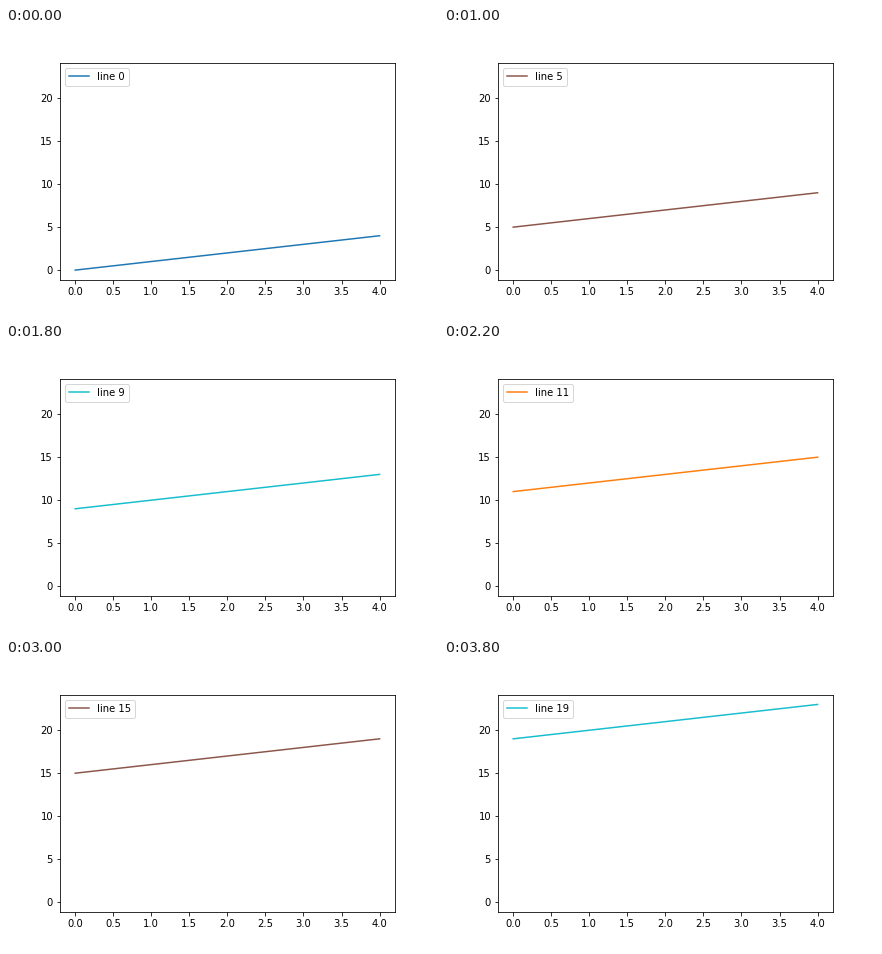
Write a matplotlib script that moves like this. It is 432 by 288 pixels and loops after 4 s.

```python
import numpy as np
import matplotlib.pyplot as plt
from matplotlib.animation import FuncAnimation

COUNT = 20
INTERVAL = 200

x = np.arange(5)

fig, ax = plt.subplots(figsize=(6, 4), dpi=72)
fig.subplots_adjust(bottom=0.125)
ax.set_xlim(-0.2, 4.2)
ax.set_ylim(-1.15, 24.15)
line, = ax.plot(x, x)


def update(i):
    line.set_ydata(x + i)
    line.set_color(f"C{i % 10}")
    line.set_label(f"line {i}")
    legend = ax.legend(handles=[line], loc="upper left")
    return line, legend


anim = FuncAnimation(fig, update, frames=COUNT, interval=INTERVAL,
                     init_func=lambda: update(0), repeat=True, repeat_delay=0)

plt.show()
```
